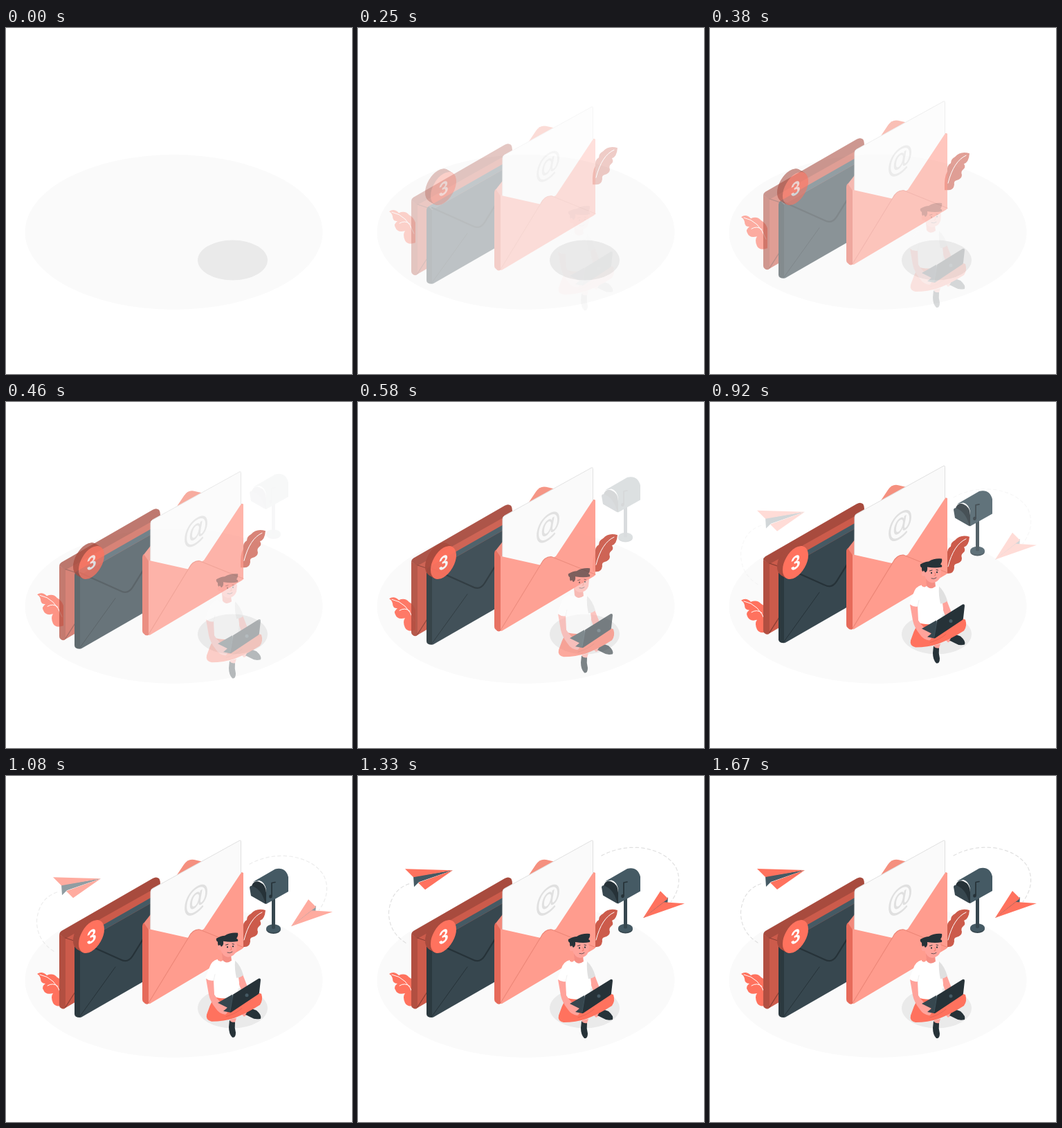
Animation, 500 px wide and 500 px high, one loop 1.71 s. Source, as an HTML page with a canvas:

```html
<!DOCTYPE html>
<html lang="en">
<head>
<meta charset="utf-8">
<title>Mail</title>
<style>
html, body { margin: 0; width: 100%; height: 100%; overflow: hidden; background: #fff; }
canvas { display: block; width: 500px; height: 500px; }
</style>
</head>
<body>
<canvas id="stage"></canvas>
<script>
const LOOP = 1710, STEP = 1000 / 24, SIZE = 500, SLIDE = 30;
const RED = '#ff725e', SALMON = '#ff9c8e', SKIN = '#ffa39b';
const INK = '#263238', SLATE = '#37474f', STEEL = '#455a64', GREY = '#e0e0e0';

const ratio = window.devicePixelRatio || 1;
const stage = document.getElementById('stage');
const layer = document.createElement('canvas');
for (const c of [stage, layer]) c.width = c.height = SIZE * ratio;
const screen2d = stage.getContext('2d');
const ctx = layer.getContext('2d');

function fill(d, color) {
  ctx.fillStyle = color;
  ctx.fill(new Path2D(d));
}

function line(d, color, width = 1, dash = []) {
  ctx.strokeStyle = color;
  ctx.lineWidth = width;
  ctx.lineCap = ctx.lineJoin = 'round';
  ctx.setLineDash(dash);
  ctx.stroke(new Path2D(d));
}

function oval(x, y, rx, ry, color, g = ctx) {
  g.fillStyle = color;
  g.beginPath();
  g.ellipse(x, y, rx, ry, 0, 0, 2 * Math.PI);
  g.fill();
}

// Draws on the isometric plane facing left-front.
function iso(x, y, draw) {
  ctx.save();
  ctx.transform(0.866, -0.5, 0, 1, x, y);
  draw();
  ctx.restore();
}

function isoText(text, x, y, font, baseline, color) {
  iso(x, y, () => {
    ctx.font = font;
    ctx.textAlign = 'center';
    ctx.fillStyle = color;
    ctx.fillText(text, 0, baseline);
  });
}

function leaves() {
  fill('M45 286Q52 281 59 288Q68 284 74 291Q80 294 83 302V331Q72 335 68 328Q64 319 68 314Q57 317 54 309Q51 304 57 300Q50 300 50 293Q49 288 45 286Z', RED);
  line('M49 287Q71 291 81 318M60 303Q68 298 75 304', '#fff');
  fill('M375 194Q362 190 354 199Q348 202 348 208Q342 211 343 220Q338 228 339 247H345Q352 247 353 239Q352 234 356 233Q364 231 364 225Q362 220 366 217Q370 214 367 209Q374 207 375 194Z', '#cc5b4b');
  line('M370 197Q352 205 344 237', '#fff');
}

function redEnvelope() {
  fill('M86 234L223 157V255L86 335Z', '#cc5b4b');
  fill('M77 229L86 234V335Q83 338 79 335Q77 334 77 331Z', '#b24f41');
  fill('M77 229Q77 226 80 224L212 148Q217 145 221 148Q223 150 223 158L86 235Z', '#a84b3e');
  line('M86 234L104 240M86 334L100 312', '#8c3f34', 1.3);
}

function darkEnvelope() {
  fill('M107 242L209 184V291L109 348.5L107 349Z', SLATE);
  fill('M99 243Q99 239 102 237L107 242V349Q99 349 99 344Z', '#2b393f');
  fill('M102 237L209 176V184L107 242Z', STEEL);
  line('M107 239L165 265Q176 271 183 260L209 218', INK, 2.2);
  line('M107 347L158 276', INK);
}

function openEnvelope() {
  fill('M209 200L257 128Q263 119 272 121L285 124L343 140V200Z', '#f5907f');
  fill('M198 214L209 200V225H206Z', '#f28a7c');
  const sheet = 'M209 167Q209 164 212 162.5L337 93.5Q339.5 92 339.5 95V200L275 260L209 240Z';
  fill(sheet, '#fafafa');
  line(sheet, GREY);
  isoText('@', 274.5, 180, 'bold 44px "Liberation Sans", sans-serif', 11.5, GREY);
  fill('M206 221L264 234L286 221L339 141Q343 137 343 143V247Q343 249 341 250L208 329Q206 330 206 327Z', SALMON);
  fill('M206 329L264 233Q270 221 280 222L343 248Z', SALMON);
  line('M206 328L264 233Q270 221 280 222L343 247.5', '#ec8677', 1.1);
  fill('M197 217Q197 214 199 212L206 222V329Q202 331 199 327Q197 326 197 322Z', '#e66a5a');
}

function envelopes() {
  redEnvelope();
  darkEnvelope();
  openEnvelope();
}

function badge() {
  const depth = 12;
  for (let i = depth; i >= 0; i--) {
    const back = i / depth;
    iso(123.5 - 8 * back, 232 - 4.7 * back, () => oval(0, 0, 21.4, 21.4, i ? '#a84b3e' : RED));
  }
  isoText('3', 123.5, 232, 'bold 26px Inter, sans-serif', 9.4, '#fff');
}

function head() {
  fill('M312 256L313 267Q318 274 326 268L325 260Z', '#f58f85');
  fill('M311 239Q308 246 310 252Q313 262 321 263Q330 262 333 254L334 245L331 237Z', SKIN);
  oval(308.5, 249.5, 2.8, 3.4, SKIN);
  fill('M304 236Q311 232 316 232Q324 227 335 228Q336 232 333 236Q336 237 335 240Q326 242 314 240Q315 246 311 248L309 245Q306 249 306 241Q303 239 304 236Z', INK);
  oval(320, 248.5, 1, 1.2, INK);
  oval(328, 247.5, 1, 1.2, INK);
  line('M317.5 245.5L321 244.5M327 244L329.5 244.5', INK, 0.9);
  line('M325 248L326 252L324 252.5', '#e66755', 0.7);
  line('M320 256.5Q324 258 327 255.5', INK, 0.7);
}

function man() {
  fill('M324 353L333 351L330 360L323 359Z', SKIN);
  fill('M340 345L349 338L352 344L344 349Z', SKIN);
  fill('M323 354Q326 358 331 357Q330 365 332 372Q332 380 327 379Q322 374 322 364Z', INK);
  fill('M348 338Q356 337 362 340Q370 347 368 352Q360 354 354 350L346 346Q349 343 348 338Z', INK);
  fill('M301 320Q294 333 290 346Q288 354 297 356Q315 356 330 351Q350 343 367 332Q372 325 369 316L360 313L330 320Z', RED);
  line('M318 349Q332 345 341 337', '#e66755');
  fill('M333 291L342 288L349 306L340 311Z', SKIN);
  fill('M305 267Q315 273 326 265Q333 268 334 276L337 300L335 315L326 322Q310 324 301 320Q299 302 302 288L305 267Z', '#fff');
  fill('M331 268Q339 275 343 289Q338 293 333 293Q330 280 331 268Z', GREY);
  fill('M306 266Q297 268 294 278L288 293Q294 298 300 297L306 280Z', '#fff');
  line('M302 288L300 297', '#ebebeb', 0.8);
  head();
  fill('M289 294Q294 298 300 297L301 317Q307 327 319 335Q322 344 317 346Q308 345 303 337Q295 327 293 317Z', SKIN);
  fill('M306 329L327 317L330 336L324 343L314 341L320 336Z', SLATE);
  fill('M328 317L365 294Q368 293 368 296L366 314Q366 316 364 317L325 343Q323 343 324 340Z', INK);
  line('M328 318L324 341', STEEL, 0.8);
  oval(348, 318, 2.5, 2.5, STEEL);
}

function mailbox() {
  oval(386.5, 221, 10.5, 6, SLATE);
  oval(386.5, 219.3, 10.5, 6, STEEL);
  fill('M384 172H389V219Q386.5 221 384 219Z', SLATE);
  fill('M357 152L389 133.5Q404 130 408 145V166L376 184V163Q374 152 366 150Z', STEEL);
  fill('M355 158Q358 149 366 152Q376 156 376 168V184L355 172Z', INK);
  fill('M352 160Q353 156 358 159Q370 164 375 184L354 172Z', SLATE);
  line('M384 154V172M384 153.5L389 152.5', INK, 1.7);
  oval(382.5, 173, 2.3, 2.6, INK);
}

function planes() {
  const dash = [4.5, 4];
  line('M69 241Q44 225 44.5 196Q48 163 76 155', GREY, 1.2, dash);
  line('M352 115Q378 101 408 103.5Q444 108 459 131Q471 156 452 182', GREY, 1.2, dash);
  ctx.setLineDash([]);
  fill('M80 145L137 136L88 153L81 160Z', STEEL);
  fill('M68 134L137 136L80 146Z', RED);
  fill('M137 136L87 154L97 164Z', RED);
  fill('M412 205L448 175L447 187Z', STEEL);
  fill('M412 205L437 166L448 177Z', RED);
  fill('M412 205L442 182L472 184Z', RED);
}

// Each group fades in while sliding from an offset, after a delay in seconds.
const groups = [
  { draw: leaves, delay: 0, from: -SLIDE },
  { draw: envelopes, delay: 0, from: SLIDE },
  { draw: badge, delay: 0, from: 0 },
  { draw: mailbox, delay: 0.4, from: -SLIDE },
  { draw: planes, delay: 0.7, from: SLIDE },
  { draw: man, delay: 0.2, from: SLIDE }
];

const bezier = (a, b, s) => 3 * s * (1 - s) ** 2 * a + 3 * s * s * (1 - s) * b + s ** 3;

// cubic-bezier(.36, -.01, .5, 1.38): rises past the end and settles.
function ease(x) {
  if (x <= 0) return 0;
  if (x >= 1) return 1;
  let lo = 0, hi = 1;
  for (let i = 0; i < 24; i++) {
    const mid = (lo + hi) / 2;
    if (bezier(0.36, 0.5, mid) < x) lo = mid; else hi = mid;
  }
  return bezier(-0.01, 1.38, lo);
}

function render(ms) {
  const tick = Math.min(40, Math.floor((ms + 4) / STEP));
  const seconds = (tick + 1) * STEP / 1000;

  screen2d.setTransform(ratio, 0, 0, ratio, 0, 0);
  screen2d.globalAlpha = 1;
  screen2d.fillStyle = '#fff';
  screen2d.fillRect(0, 0, SIZE, SIZE);
  oval(242.5, 295, 215, 112, '#fafafa', screen2d);
  oval(327.5, 335.5, 50.5, 29, '#eaeaea', screen2d);

  for (const { draw, delay, from } of groups) {
    const amount = ease(seconds - delay);
    if (amount < 0.01) continue;
    ctx.setTransform(ratio, 0, 0, ratio, 0, 0);
    ctx.clearRect(0, 0, SIZE, SIZE);
    ctx.translate(0, from * (1 - amount));
    draw();
    screen2d.globalAlpha = Math.min(1, amount);
    screen2d.drawImage(layer, 0, 0, SIZE, SIZE);
  }
}

const start = performance.now();
function loop() {
  render((performance.now() - start) % LOOP);
  requestAnimationFrame(loop);
}
loop();
</script>
</body>
</html>
```
